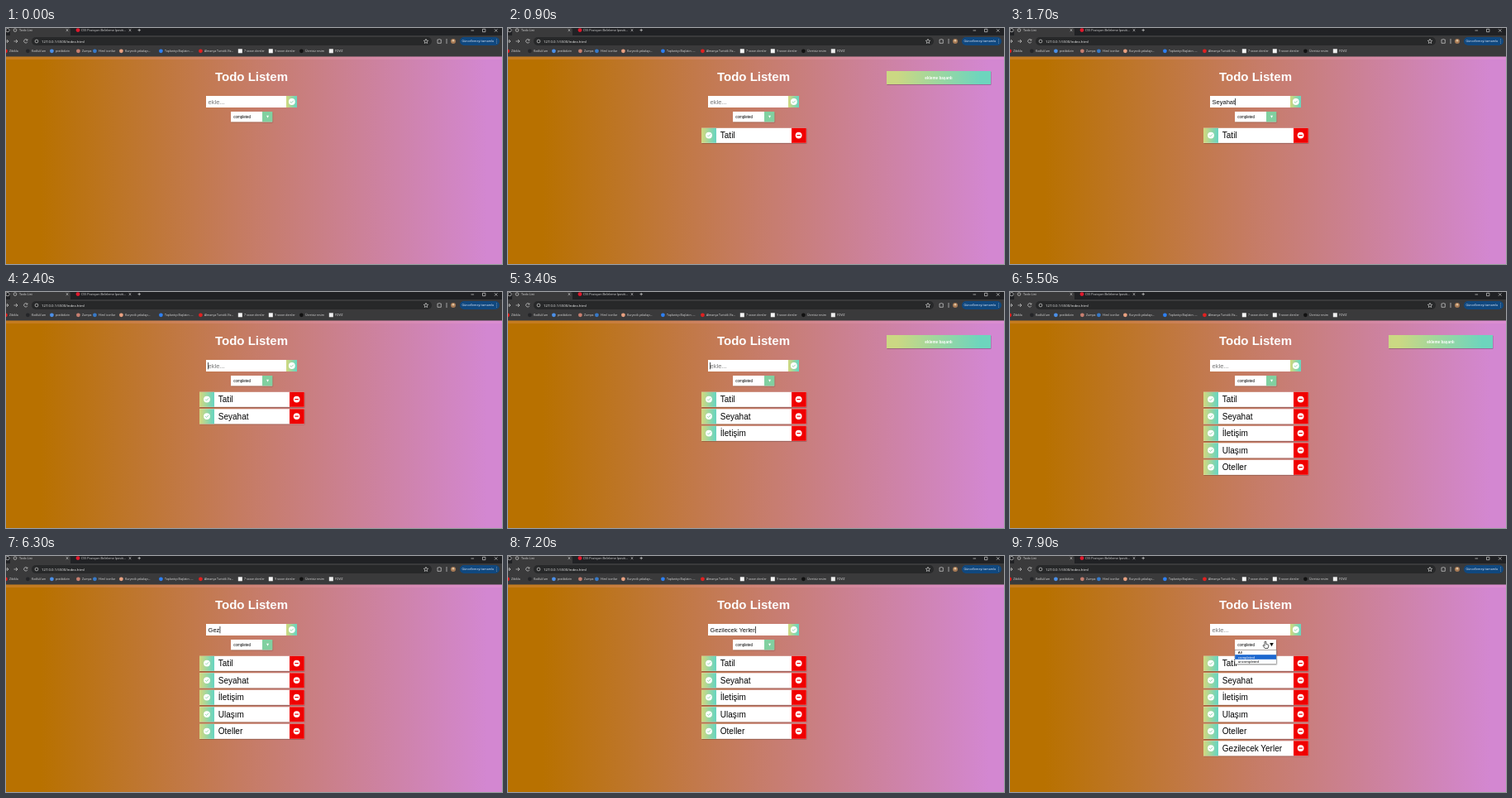
Write an HTML page that moves like this. It is 600 px wide and 285 px high and loops after 8000 ms.

```html
<!DOCTYPE html>
<html lang="tr">
<head>
<meta charset="utf-8">
<title>Todo List</title>
<style>
html, body { margin: 0; width: 100%; height: 100%; overflow: hidden; }
svg { display: block; width: 600px; height: 285px; font-family: "Liberation Sans", Arial, sans-serif; }
.ui { font-family: "Open Sans", "Noto Sans", sans-serif; fill: #dcdcdc; }
.line { fill: none; stroke: #d0d0d0; stroke-width: .7; }
</style>
</head>
<body>
<svg viewBox="0 0 600 285">
  <defs>
    <linearGradient id="page">
      <stop offset=".07" stop-color="#b87100"/>
      <stop offset=".5" stop-color="#c67c68"/>
      <stop offset=".97" stop-color="#d387d1"/>
    </linearGradient>
    <linearGradient id="mint">
      <stop offset=".1" stop-color="#cbd883"/>
      <stop offset=".9" stop-color="#6dd5bd"/>
    </linearGradient>
    <filter id="shadow" x="-20%" y="-20%" width="140%" height="150%">
      <feDropShadow dx=".4" dy=".7" stdDeviation=".7" flood-opacity=".35"/>
    </filter>
    <g id="check">
      <circle r="3.9" fill="#fff"/>
      <path d="M-1.9 0L-.5 1.4 2-1.3" fill="none" stroke="#86d3a8" stroke-width=".9"/>
    </g>
    <g id="minus">
      <circle r="3.9" fill="#fff"/>
      <path d="M-2.2 0H2.2" stroke="#f00000" stroke-width="1.2"/>
    </g>
  </defs>

  <rect y="34" width="600" height="251" fill="url(#page)"/>
  <rect y="34" width="600" height="4" fill="#ffb0c8" opacity=".16"/>

  <g id="browser" class="ui">
    <rect width="600" height="10" fill="#202124"/>
    <path d="M5 9.5V1Q5 0 7 0H76Q78 0 78 2V9.5Z" fill="#3a3a3b"/>
    <rect y="9" width="600" height="25.5" fill="#3a3a3b"/>
    <rect x="31" y="11" width="484" height="10" rx="5" fill="#272829"/>
    <rect x="549" y="11" width="48" height="10" rx="5" fill="#10487f"/>
    <circle cx="87" cy="2.6" r="2.4" fill="#e0182d"/>
    <circle cx="11" cy="2.6" r="1.8" class="line"/>
    <circle cx="2" cy="2.6" r="2.2" class="line"/>
    <circle cx="37" cy="16" r="1.9" class="line"/>
    <circle cx="541" cy="16" r="3" fill="#a77a55"/>
    <circle cx="541" cy="15.2" r="1.3" fill="#e2c4a0"/>
    <path class="line" d="M72.7 1.3l2.6 2.6m0-2.6l-2.6 2.6M148.7 1.3l2.6 2.6m0-2.6l-2.6 2.6M159.5 2.6h3.4m-1.7-1.7v3.4M562.5 3h3.6M576.5 1.3h3.4v3.4h-3.4zM591 1.3l3.4 3.4m0-3.4l-3.4 3.4M1 14l2 2-2 2M-1 16h4M9.5 16h4.5m-2-2l2 2-2 2M25.7 14.6a2.2 2.2 0 1 0 .2 2.1m0-3.2v1.5h-1.6M522 14h1.5q.7-1.5 1.4 0h1.4v4.3H522zM533 13v6"/>
    <path d="M508 13.3l.8 1.8 1.9.2-1.4 1.3.4 1.9-1.7-1-1.7 1 .4-1.9-1.4-1.3 1.9-.2z" class="line"/>
    <path d="M593.5 13.5v.8m0 1.3v.8m0 1.3v.8" class="line"/>
    <text x="16" y="4.3" font-size="3.8">Todo List</text>
    <text x="91" y="4.3" font-size="3.7">CSS Pozisyon Belirleme (positi…</text>
    <text x="43" y="17.8" font-size="4.3" fill="#f0f0f0">127.0.0.1:5500/index.html</text>
    <text x="551.5" y="17.4" font-size="3.6" fill="#e8f0ff">Güncellemeyi tamamla</text>
  </g>

  <text x="297" y="63.5" text-anchor="middle" font-size="15" font-weight="bold" fill="#fff">Todo Listem</text>

  <rect x="242" y="82" width="98" height="14" fill="#fff"/>
  <rect x="339" y="82" width="13" height="14" fill="url(#mint)"/>
  <use href="#check" x="345.8" y="89"/>
  <text id="input" x="244.6" y="91.7" font-size="7.5"></text>
  <rect id="caret" y="85" width=".7" height="8.3"/>

  <g id="items"></g>

  <g filter="url(#shadow)">
    <rect x="272" y="101" width="50" height="12.3" fill="#fff"/>
    <rect id="arrowBox" x="310" y="101" width="12.3" height="12.3" fill="#81d0a0"/>
  </g>
  <text x="275.3" y="108.8" font-size="4.5">completed</text>
  <path id="arrow"/>

  <g id="menu" font-size="4.4">
    <rect x="272" y="113.4" width="50.2" height="17.3" fill="#fff" stroke="#777" stroke-width=".5" filter="url(#shadow)"/>
    <rect x="272.2" y="119.2" width="49.8" height="5.6" fill="#1b67cf"/>
    <text x="275.8" y="117.8">All</text>
    <text x="275.8" y="123.5" fill="#fff">completed</text>
    <text x="275.8" y="129">uncompleted</text>
  </g>

  <g id="note">
    <rect x="458" y="52" width="126" height="16" fill="url(#mint)" filter="url(#shadow)"/>
    <text x="521" y="61.6" text-anchor="middle" font-size="4.65" font-weight="bold" fill="#fff">ekleme başarılı</text>
  </g>

  <path id="hand" d="M-1-3Q0-4 .8-3V0L3.3.6Q4 1 3.8 2.2L3 5H-.6L-2.8 2Q-3 .8-1.8 1.2L-1 2Z" fill="#fff" stroke="#111" stroke-width=".7"/>
</svg>
<script>
const $ = id => document.getElementById(id);
const show = (id, on) => $(id).setAttribute('visibility', on ? 'visible' : 'hidden');
const clamp = v => Math.max(0, Math.min(1, v));

// label, x, icon colour
const bookmarks = [
  ['Zibikla', 4, '#f01818'], ["Kodluk'um", 31, '#242528'], ['pratikdizin', 60, '#4b8fe8'],
  ['Zumpa', 92, '#c77f70'], ['Html icorilar', 112, '#3779c8'], ['Kuryecik yakalayı…', 144, '#e8a080'],
  ['Toplantıyı Başlatın -…', 192, '#2d7ff0'], ['Almanya Turistik Viz…', 240, '#e02020'],
  ['7 sezon dersler', 288, '#f4f4f4'], ['9 sezon dersler', 325, '#f4f4f4'],
  ['Ücretsiz resim', 362, '#111'], ['FOVIZ', 398, '#eee']
];
$('browser').innerHTML += bookmarks.map(([label, x, color], i) => {
  const icon = i < 8 || i === 10
    ? `<circle cx="${x - 4.6}" cy="27.8" r="2.4" fill="${color}"/>`
    : `<rect x="${x - 7.2}" y="25.3" width="5" height="5" fill="${color}"/>`;
  return `${icon}<text x="${x}" y="29.1" font-size="3.5">${label}</text>`;
}).join('');

// text, typing start, typing end, time added
const todos = [
  ['Tatil', 100, 600, 700], ['Seyahat', 1200, 1700, 1800], ['İletişim', 2500, 3100, 3200],
  ['Ulaşım', 3900, 4400, 4500], ['Oteller', 4900, 5300, 5400], ['Gezilecek Yerler', 6200, 7100, 7300]
];
$('items').innerHTML = todos.map(([text], i) => `
  <g id="item${i}" transform="translate(234 ${120.8 + i * 20.5})">
    <rect width="126.8" height="18" fill="#fff" filter="url(#shadow)"/>
    <rect width="18" height="18" fill="url(#mint)"/>
    <rect x="109" width="17.8" height="18" fill="#f00000"/>
    <use href="#check" x="9" y="8.8"/>
    <use href="#minus" x="117.6" y="8.8"/>
    <text x="22.8" y="12.4" font-size="10">${text}</text>
  </g>`).join('');

function draw(t) {
  let typed = '', alpha = 0;
  todos.forEach(([text, start, end, added], i) => {
    show('item' + i, t >= added);
    if (t >= start && t < added) typed = text.slice(0, Math.ceil(clamp((t - start + 50) / (end - start)) * text.length));
    const age = t - added;
    if (age >= 0) alpha = Math.max(alpha, clamp(Math.min(age, 550 - age) / 100));
  });
  $('note').setAttribute('opacity', alpha);

  const input = $('input');
  input.textContent = typed || 'ekle...';
  input.setAttribute('fill', typed ? '#111' : '#777');
  $('caret').setAttribute('x', typed ? 244.8 + input.getComputedTextLength() : 244.2);
  show('caret', typed || (t % 1000 >= 200 && t % 1000 < 500));

  const hover = t >= 7700;
  show('arrowBox', !hover);
  $('arrow').setAttribute('d', hover ? 'M314.2 105h4.6l-2.3 4.3z' : 'M315.1 105.8h2.9l-1.45 3z');
  $('arrow').setAttribute('fill', hover ? '#111' : '#fff');
  show('menu', t >= 7800);
  show('hand', t >= 7500);
  const away = (1 - clamp((t - 7500) / 300)) ** 2;
  $('hand').setAttribute('transform', `translate(${309 + 45 * away} ${106.5 + 50 * away})`);
}

function tick(now) {
  draw(Math.floor(now % 8000 / 100) * 100);
  requestAnimationFrame(tick);
}
draw(0);
requestAnimationFrame(tick);
</script>
</body>
</html>
```
